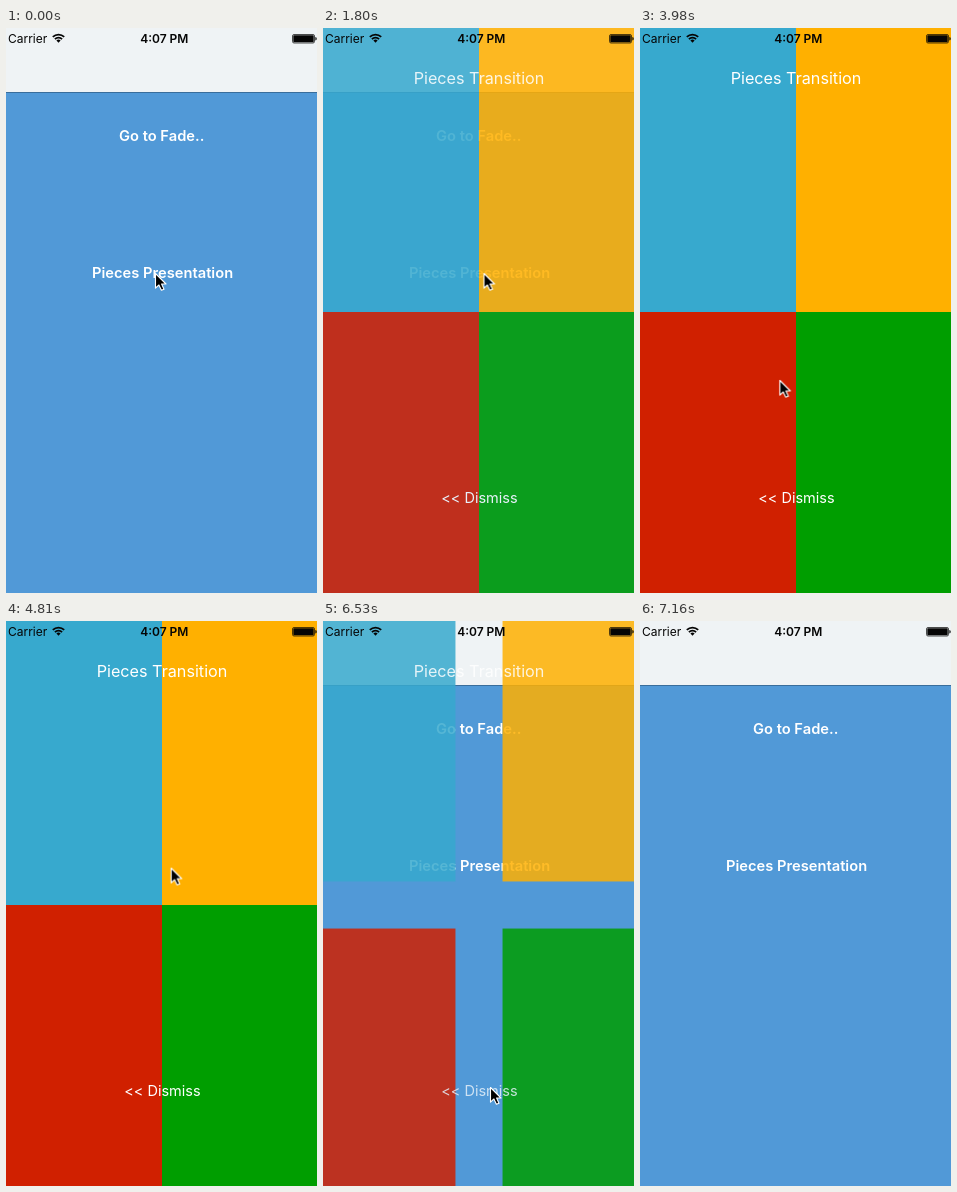
These frames come from a looping animation (311 by 565 pixels, 7570 ms). An HTML page:

```html
<!DOCTYPE html>
<html lang="en">
<head>
<meta charset="utf-8">
<title>Pieces transition</title>
<style>
  html, body { margin: 0; width: 100%; height: 100%; overflow: hidden; background: #5199d7; }
  svg { display: block; width: 311px; height: 565px; font-family: Inter, Roboto, sans-serif; }
  .button { font-size: 14.7px; font-weight: 600; fill: #fff; text-anchor: middle; }
  .status { font-size: 12px; fill: #050505; }
  .time { font-weight: 600; text-anchor: middle; }
  #title { font-size: 16.2px; fill: #fff; text-anchor: middle; }
  #dismiss { font-size: 14.5px; fill: #fff; text-anchor: middle; }
  .piece, #title, #dismiss { opacity: 0; }
</style>
</head>
<body>
<svg viewBox="0 0 311 565">
  <rect width="311" height="565" fill="#5199d7"/>
  <rect width="311" height="64" fill="#eff3f5"/>
  <rect y="64" width="311" height="1" fill="#396d9b"/>
  <text class="button" x="155.7" y="112.5">Go to Fade..</text>
  <text class="button" id="present" x="156.6" y="249.5">Pieces Presentation</text>

  <rect class="piece" width="156" height="284" fill="#37a9ce"/>
  <rect class="piece" x="156" width="155" height="284" fill="#ffb000"/>
  <rect class="piece" y="284" width="156" height="281" fill="#d02000"/>
  <rect class="piece" x="156" y="284" width="155" height="281" fill="#009e00"/>
  <text id="title" x="156" y="56">Pieces Transition</text>
  <text id="dismiss" x="156.4" y="474.5">&lt;&lt; Dismiss</text>

  <g class="status">
    <text x="2" y="14.5">Carrier</text>
    <text class="time" x="158.3" y="14.5">4:07 PM</text>
    <g fill="none" stroke="#050505" stroke-width="1.8">
      <path d="M46.8 8.9a8.2 8.2 0 0 1 11.4 0"/>
      <path d="M48.9 11.2a5.2 5.2 0 0 1 7.2 0"/>
    </g>
    <path d="M50.4 12.6a3 3 0 0 1 4.2 0L52.5 14.8z"/>
    <rect x="286.5" y="6.5" width="22" height="8.5" rx="1.5" fill="none" stroke="#050505" stroke-width=".7"/>
    <rect x="287.3" y="7.3" width="20.4" height="6.9" rx=".6"/>
    <path d="M309.4 9q1.3.2 1.3 1.7t-1.3 1.7z"/>
  </g>

  <g id="cursor">
    <path d="M.5.5V15.2L3.9 12 6.4 17.3 9 16.2 6.6 11H11z"
      stroke="#fff" stroke-width="1.1" stroke-linejoin="round"/>
  </g>
</svg>
<script>
const LOOP = 7570;
const SHOW = [1276, 1882];
const HIDE = [6370, 6965];
const TINT = 'rgb(82,153,215)';
const EASE = 'ease-in-out';
const $ = id => document.getElementById(id);

// steps: [ms, properties, easing towards the next step]
function play(el, steps) {
  const frames = steps.map(([ms, props, easing = 'linear']) =>
    ({ ...props, easing, offset: ms / LOOP }));
  el.animate(frames, { duration: LOOP, iterations: Infinity });
}

const move = (x, y) => ({ transform: `translate(${x}px, ${y}px)` });

// Pieces fade in where they stand, then drift apart while fading out.
const SPREAD = 155;
document.querySelectorAll('.piece').forEach((piece, i) => {
  const dx = i % 2 ? SPREAD : -SPREAD;
  const dy = i > 1 ? SPREAD : -SPREAD;
  play(piece, [
    [0, { opacity: 0, ...move(0, 0) }],
    [SHOW[0], { opacity: 0, ...move(0, 0) }],
    [SHOW[1], { opacity: 1, ...move(0, 0) }],
    [HIDE[0], { opacity: 1, ...move(0, 0) }, EASE],
    [HIDE[1], { opacity: 0, ...move(dx, dy) }],
    [LOOP, { opacity: 0, ...move(dx, dy) }]
  ]);
});

play($('title'), [
  [0, { opacity: 0 }],
  [SHOW[0], { opacity: 0 }],
  [SHOW[1], { opacity: 1 }],
  [HIDE[0], { opacity: 1 }, EASE],
  [HIDE[1], { opacity: 0 }],
  [LOOP, { opacity: 0 }]
]);

play($('dismiss'), [
  [0, { opacity: 0, fill: TINT }],
  [SHOW[0], { opacity: 0, fill: TINT }],
  [1428, { opacity: 1, fill: 'rgb(125,178,225)' }],
  [SHOW[1], { opacity: 1, fill: '#fff' }],
  [6240, { opacity: 1, fill: '#fff' }, 'step-end'],
  [6240, { opacity: .4, fill: '#fff' }],
  [6340, { opacity: .4, fill: '#fff' }],
  [HIDE[0], { opacity: 1, fill: '#fff' }, EASE],
  [HIDE[1], { opacity: 0, fill: TINT }],
  [LOOP, { opacity: 0, fill: TINT }]
]);

play($('present'), [
  [0, { opacity: 1 }],
  [1040, { opacity: 1 }],
  [1040, { opacity: .4 }],
  [1180, { opacity: .4 }],
  [1280, { opacity: 1 }],
  [LOOP, { opacity: 1 }]
]);

// Pointer path: [ms, x, y, easing]
const path = [
  [0, 149, 245], [110, 149, 245, 'ease-out'], [260, 158.5, 245],
  [740, 158.5, 245, 'step-end'], [740, 160.5, 245],
  [2160, 160.5, 245, EASE], [2650, 160, 472],
  [2790, 160, 472, 'ease-out'], [2960, 161.5, 481], [3280, 161.5, 482],
  [3770, 161.5, 482, 'ease-in'], [4060, 124, 262, 'ease-out'], [4360, 190, 232],
  [4530, 190, 232, EASE], [4660, 158, 254],
  [4800, 158, 254, 'step-end'], [4810, 164, 247, 'ease-out'], [4970, 225, 212],
  [5140, 225, 212, EASE], [5490, 167.5, 462],
  [5690, 167.5, 462], [5760, 167, 466],
  [7030, 167, 466, 'ease-in'], [7160, 243, 566], [LOOP, 243, 566]
];
play($('cursor'), path.map(([ms, x, y, easing]) => [ms, move(x, y), easing]));
</script>
</body>
</html>
```
